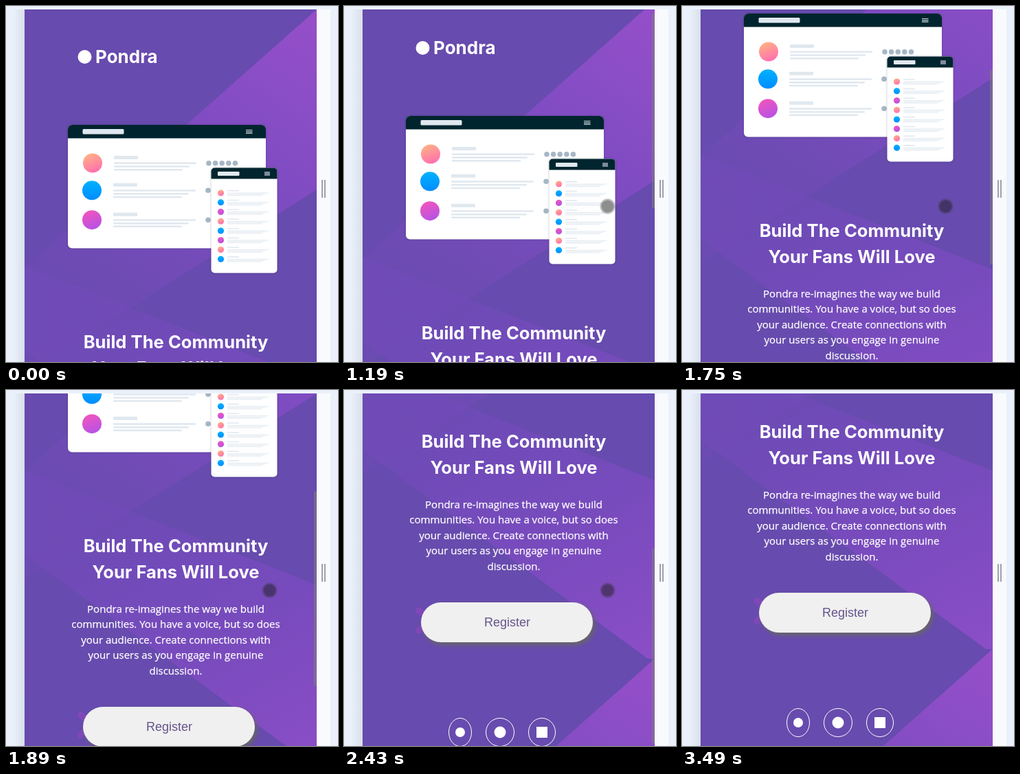
Animation of 483x518 px, one loop 4.7 s. Source, as an HTML page:

```html
<!DOCTYPE html>
<html lang="en">
<head>
<meta charset="utf-8">
<title>Mobile landing page</title>
<style>
@property --s { syntax: "<number>"; inherits: true; initial-value: 0; }
html, body { margin: 0; height: 100%; overflow: hidden; background: #ebf1fa; }
.stage { display: block; width: 483px; height: 518px; animation: scroll 4.7s step-end infinite; }
.page { transform: translateY(calc(var(--s) * -1px)); }
.thumb { transform: translateY(calc(var(--s) * .548px)); }
.bar { animation: bar 4.7s step-end infinite; }
.touch { animation: touch 4.7s step-end infinite; }
text { fill: #fff; }
.head { font: 700 25.6px Inter, sans-serif; text-anchor: middle; }
.logo { font: 700 26px Inter, sans-serif; }
.copy { font: 400 15px "Open Sans", sans-serif; text-anchor: middle; stroke: #fff; stroke-width: .25px; }
.label { font: 400 18px "Liberation Sans", Arial, sans-serif; text-anchor: middle; fill: #65548c; }
.pale { fill: #e0e8ef; }
.shade { filter: drop-shadow(0 0 1.5px rgba(0, 20, 40, .3)); }
.button { filter: drop-shadow(3px 4px 3px #666); }

/* wheel scrolling in three bursts */
@keyframes scroll {
  0% { --s: 0; }
  25.317% { --s: 13; } 26.807% { --s: 56; } 28.296% { --s: 90; } 29.786% { --s: 100; }
  35.743% { --s: 112; } 37.233% { --s: 162; } 38.722% { --s: 218; }
  40.211% { --s: 262; } 41.701% { --s: 290; } 43.19% { --s: 300; }
  48.722% { --s: 315; } 50.211% { --s: 372; } 51.701% { --s: 414; }
  53.19% { --s: 424; } 54.679% { --s: 427; } 56.169% { --s: 428; }
  100% { --s: 428; }
}
@keyframes bar {
  0% { visibility: hidden; }
  25.317% { visibility: visible; }
  64.892%, 100% { visibility: hidden; }
}
@keyframes touch {
  0% { visibility: hidden; transform: translate(434px, 494px); }
  6.807% { visibility: visible; transform: translate(434px, 494px); }
  8.296% { visibility: visible; transform: translate(420px, 438px); }
  9.786% { visibility: visible; transform: translate(404px, 370px); }
  11.275% { visibility: visible; transform: translate(391px, 319px); }
  12.765% { visibility: visible; transform: translate(385px, 297px); }
  14.041% { visibility: visible; transform: translate(383.5px, 291.5px); }
  69.998% { visibility: visible; transform: translate(386px, 301px); }
  71.275% { visibility: visible; transform: translate(402px, 362px); }
  72.764% { visibility: visible; transform: translate(427px, 458px); }
  74.254%, 100% { visibility: hidden; transform: translate(427px, 458px); }
}
</style>
</head>
<body>
<svg class="stage" viewBox="0 0 483 518">
  <defs>
    <linearGradient id="upper" gradientUnits="userSpaceOnUse" x1="452" y1="5" x2="150" y2="450">
      <stop offset="0" stop-color="#964fc9"/>
      <stop offset=".45" stop-color="#7f4cc2"/>
      <stop offset="1" stop-color="#7f4cc2" stop-opacity=".16"/>
    </linearGradient>
    <linearGradient id="lower" gradientUnits="userSpaceOnUse" x1="452" y1="805" x2="250" y2="400">
      <stop offset="0" stop-color="#8b4ec6"/>
      <stop offset=".5" stop-color="#784bbd"/>
      <stop offset="1" stop-color="#7a4bc4" stop-opacity=".3"/>
    </linearGradient>
    <linearGradient id="peach" x1=".3" y1="0" x2=".7" y2="1">
      <stop offset="0" stop-color="#ffb184"/><stop offset="1" stop-color="#ff6db2"/>
    </linearGradient>
    <linearGradient id="blue" x2="0" y2="1">
      <stop offset="0" stop-color="#00b2ff"/><stop offset="1" stop-color="#008cff"/>
    </linearGradient>
    <linearGradient id="pink" x1=".3" y1="0" x2=".7" y2="1">
      <stop offset="0" stop-color="#f254bd"/><stop offset="1" stop-color="#b353e6"/>
    </linearGradient>
    <linearGradient id="edge">
      <stop offset="0" stop-color="#647896" stop-opacity="0"/>
      <stop offset="1" stop-color="#647896" stop-opacity=".14"/>
    </linearGradient>

    <g id="tile">
      <path fill="url(#upper)" d="M452 5V267L27 537V381Z"/>
      <path fill="url(#lower)" d="M27 378L452 545.5V805H442L27 501Z"/>
    </g>
    <g id="row">
      <circle r="14"/>
      <g class="pale">
        <rect x="31" y="-10.5" width="35" height="5" rx="1"/>
        <rect x="31" y="-1" width="120" height="2.5" rx="1"/>
        <rect x="31" y="3.7" width="110" height="2.5" rx="1"/>
        <rect x="31" y="8.4" width="100" height="2.5" rx="1"/>
      </g>
    </g>
    <g id="item">
      <circle r="4.6"/>
      <g class="pale">
        <rect x="9.5" y="-4" width="17" height="1.5"/>
        <rect x="9.5" y="-.4" width="60" height="1"/>
        <rect x="9.5" y="1.4" width="55" height="1"/>
        <rect x="9.5" y="3.2" width="50" height="1"/>
      </g>
    </g>
  </defs>

  <rect x="10" y="5" width="17" height="513" fill="url(#edge)"/>
  <rect x="452" y="5" width="20" height="513" fill="#f9fafd"/>
  <path d="M460 253V279M464 253V279" stroke="#9fa0b0" stroke-width="2"/>

  <svg x="27" y="5" width="425" height="513" viewBox="27 5 425 513">
    <rect x="27" y="5" width="425" height="513" fill="#674bae"/>
    <g class="page">
      <use href="#tile"/>
      <use href="#tile" y="800"/>

      <circle cx="114.5" cy="74" r="10" fill="#fff"/>
      <text class="logo" x="130" y="83">Pondra</text>

      <g class="shade">
        <rect x="90" y="173" width="288" height="179.5" rx="6" fill="#fff"/>
        <path fill="#00252e" d="M90 192.5V179a6 6 0 0 1 6-6H372a6 6 0 0 1 6 6V192.5Z"/>
      </g>
      <rect class="pale" x="111.5" y="179" width="60" height="7.5" rx="1.5"/>
      <path d="M349 180.5h9.5m-9.5 2.3h9.5m-9.5 2.3h9.5" stroke="#cfd9e0" stroke-width="1.2"/>
      <use href="#row" x="126" y="228.5" fill="url(#peach)"/>
      <use href="#row" x="125" y="268.3" fill="url(#blue)"/>
      <use href="#row" x="125" y="311.2" fill="url(#pink)"/>
      <g fill="#a6b7c5">
        <circle cx="295" cy="228.7" r="3.8"/>
        <circle cx="304.6" cy="228.7" r="3.8"/>
        <circle cx="314.2" cy="228.7" r="3.8"/>
        <circle cx="323.8" cy="228.7" r="3.8"/>
        <circle cx="333.4" cy="228.7" r="3.8"/>
        <circle cx="294" cy="268.3" r="3.8"/>
        <circle cx="294" cy="311.2" r="3.8"/>
      </g>

      <g class="shade">
        <rect x="298.5" y="235.5" width="96" height="153" rx="5" fill="#fff"/>
        <path fill="#00252e" d="M298.5 251.5V240.5a5 5 0 0 1 5-5H389.5a5 5 0 0 1 5 5V251.5Z"/>
      </g>
      <rect class="pale" x="308" y="241" width="31.5" height="6" rx="1"/>
      <rect x="376" y="241" width="8" height="6" fill="#7c8b9d"/>
      <g id="list"></g>

      <text class="head" x="247" y="498">Build The Community</text>
      <text class="head" x="247" y="536">Your Fans Will Love</text>
      <g class="copy">
        <text x="247" y="586">Pondra re-imagines the way we build</text>
        <text x="247" y="608">communities. You have a voice, but so does</text>
        <text x="247" y="631">your audience. Create connections with</text>
        <text x="247" y="653">your users as you engage in genuine</text>
        <text x="247" y="676">discussion.</text>
      </g>

      <path d="M109 735L130 753M109 764L130 746" stroke="#7f48b8" stroke-width="10" stroke-linecap="round"/>
      <rect class="button" x="112" y="723" width="250" height="58" rx="29" fill="#f0f0f0"/>
      <text class="label" x="237.5" y="758">Register</text>

      <g fill="none" stroke="#fff">
        <ellipse cx="169" cy="912" rx="16.5" ry="20.5"/>
        <ellipse cx="227" cy="912" rx="20.5" ry="20.5"/>
        <ellipse cx="288" cy="912" rx="19.5" ry="20.5"/>
      </g>
      <g fill="#fff">
        <circle cx="169" cy="912" r="7"/>
        <circle cx="227" cy="912" r="8.5"/>
        <rect x="280" y="904" width="16" height="16"/>
      </g>
    </g>
    <g class="bar">
      <rect class="thumb" x="448" y="4" width="4" height="283" fill="#808080" fill-opacity=".55"/>
    </g>
  </svg>

  <g class="touch">
    <circle r="10" fill="none" stroke="#3c3c3c" stroke-opacity=".35" stroke-width="2"/>
    <circle r="9" fill="#1e1e1e" fill-opacity=".5"/>
  </g>
</svg>
<script>
const fills = ["peach", "blue", "pink"];
const list = document.getElementById("list");
for (let i = 0; i < 8; i++) {
  const item = document.createElementNS("http://www.w3.org/2000/svg", "use");
  const attrs = { href: "#item", x: 312.5, y: 272 + i * 13.75, fill: `url(#${fills[i % 3]})` };
  for (const [name, value] of Object.entries(attrs)) item.setAttribute(name, value);
  list.append(item);
}
</script>
</body>
</html>
```
